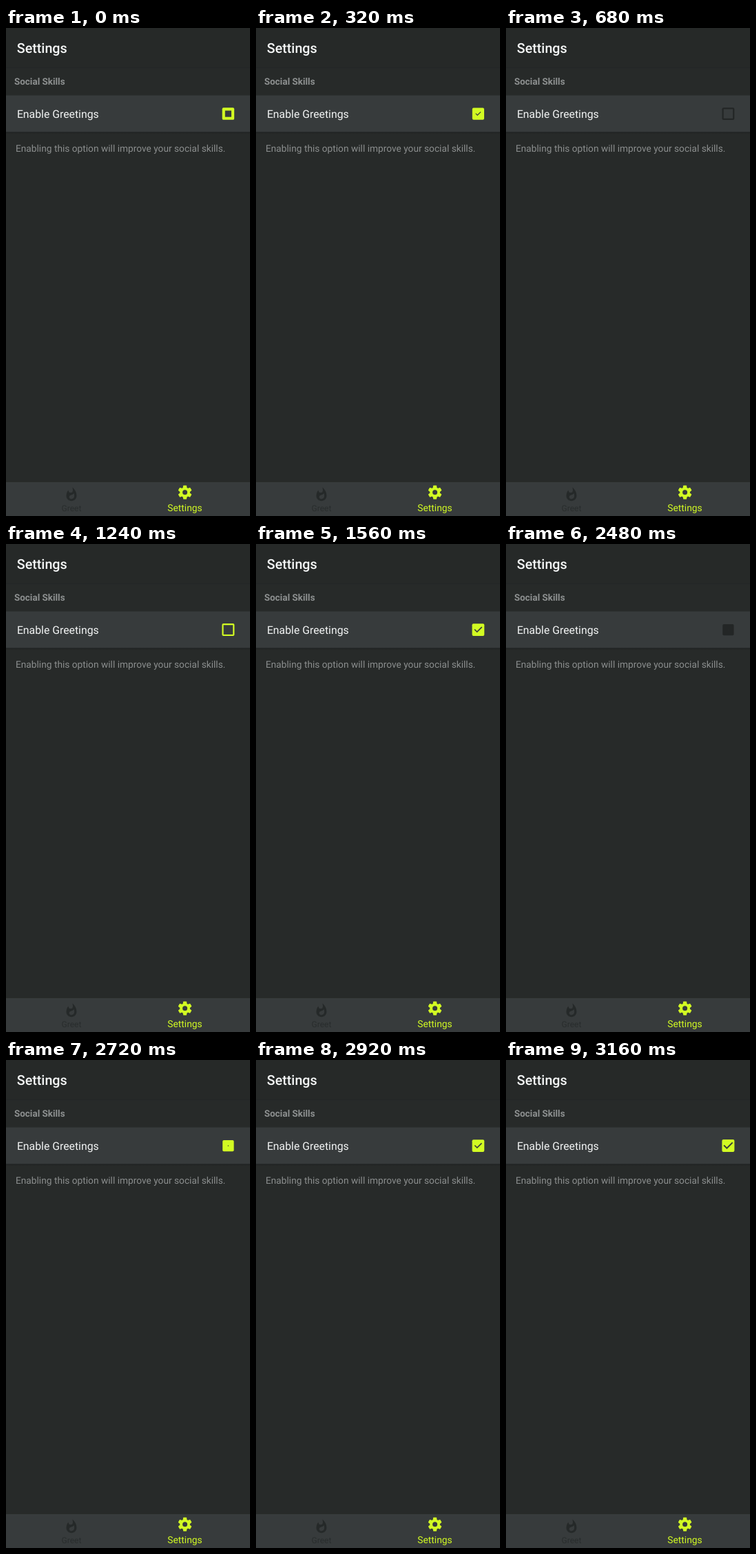
These frames come from a looping animation (354 by 706 pixels, 4.4 s). An HTML page:

```html
<!DOCTYPE html>
<html lang="en">
<head>
<meta charset="utf-8">
<title>Settings</title>
<style>
  html, body { margin: 0; width: 100%; height: 100%; overflow: hidden; background: #272a29; }
  svg { display: block; width: 100vw; height: 100vh; font-family: Roboto, sans-serif; text-rendering: geometricPrecision; }
</style>
</head>
<body>
<svg viewBox="0 0 354 706">
  <defs>
    <linearGradient id="shade" x1="0" y1="0" x2="0" y2="1">
      <stop offset="0" stop-color="#1f2222"/>
      <stop offset="1" stop-color="#272a29"/>
    </linearGradient>
  </defs>
  <rect width="354" height="706" fill="#272a29"/>
  <rect width="354" height="57" fill="#262928"/>
  <rect y="57" width="354" height="1" fill="#232626"/>
  <rect y="97.5" width="354" height="53" fill="#373b3c"/>
  <rect y="150.5" width="354" height="3" fill="url(#shade)"/>
  <rect y="657" width="354" height="49" fill="#373b3c"/>

  <text x="15.8" y="35.8" font-size="19.7" font-weight="500" fill="#f6f8f8">Settings</text>
  <text x="12" y="82" font-size="13.45" font-weight="700" fill="#8d9090">Social Skills</text>
  <text x="15.9" y="130.2" font-size="15.8" fill="#f2f4f4">Enable Greetings</text>
  <text x="14" y="179" font-size="13.73" fill="#8b8e8e">Enabling this option will improve your social skills.</text>

  <g id="check">
    <rect id="box" x="-9" y="-9" width="18" height="18" rx="2"/>
    <rect id="hole" fill="#373b3c"/>
    <path id="tick" fill="#373b3c" d="M-2 5L-7 0-5.59-1.41-2 2.17 5.59-5.42 7-4z"/>
  </g>

  <path transform="translate(83.8 663.8) scale(.93)" fill="#252929" fill-rule="evenodd"
    d="M13.5.67s.74 2.65.74 4.8c0 2.06-1.35 3.73-3.41 3.73-2.07 0-3.63-1.67-3.63-3.73l.03-.36C5.21 7.51 4 10.62 4 14c0 4.42 3.58 8 8 8s8-3.58 8-8C20 8.61 17.41 3.8 13.5.67zM11.71 19c-1.78 0-3.22-1.4-3.22-3.14 0-1.62 1.05-2.76 2.81-3.12 1.77-.36 3.6-1.21 4.62-2.58.39 1.29.59 2.65.59 4.04 0 2.65-2.15 4.8-4.8 4.8z"/>
  <text x="95" y="698.8" font-size="12" text-anchor="middle" fill="#292d2d">Greet</text>

  <g id="gear" transform="translate(259.6 671.8)" fill="#d2fb23">
    <circle r="7.4"/>
    <circle id="hub" r="3.5" fill="#373b3c"/>
  </g>
  <text x="259.5" y="699.3" font-size="13.8" text-anchor="middle" fill="#d2fb23">Settings</text>
</svg>
<script>
const LOOP = 4400, FILL = 166, DRAW = 334;
const ON = '#d2fb23', OFF = '#232626';
const $ = id => document.getElementById(id);
const check = $('check'), box = $('box'), hole = $('hole'), tick = $('tick');

for (let i = 0; i < 6; i++) {
  const tooth = document.createElementNS('http://www.w3.org/2000/svg', 'path');
  tooth.setAttribute('d', 'M-3-6.4L-2.4-9.5Q-2.3-10-1.8-10H1.8Q2.3-10 2.4-9.5L3-6.4z');
  tooth.setAttribute('transform', `rotate(${i * 60})`);
  $('gear').insertBefore(tooth, $('hub'));
}

// Taps: start time, new state, and how far the transition has already run
const taps = [
  { at: 120, on: true, skip: 46 },
  { at: 340, on: false, skip: 0 },
  { at: 1240, on: true, skip: 0 },
  { at: 2360, on: false, skip: 0 },
  { at: 2617, on: true, skip: 0 }
];

const part = (t, from, len) => Math.min(1, Math.max(0, (t - from) / len));
const easeOut = p => 1 - (1 - p) ** 3;

// Standard curve: cubic-bezier(.4, 0, .2, 1)
function standard(x) {
  let lo = 0, hi = 1;
  for (let i = 0; i < 20; i++) {
    const m = (lo + hi) / 2;
    const bx = 1.2 * m * (1 - m) ** 2 + 0.6 * m * m * (1 - m) + m ** 3;
    if (bx < x) lo = m; else hi = m;
  }
  return 3 * lo * lo * (1 - lo) + lo ** 3;
}

function draw(t) {
  const tap = taps.filter(p => p.at <= t).pop() || taps[0];
  const run = Math.max(0, t - tap.at) + tap.skip;
  const shrink = standard(part(run, 0, FILL)), grow = easeOut(part(run, FILL, DRAW));
  let size, scale;
  if (tap.on) {
    size = 13.6 * (1 - shrink);
    scale = run > FILL ? 0.1 + 0.9 * grow : 0;
  } else {
    size = 13.6 * standard(part(run, FILL, FILL));
    scale = run < FILL ? 1 - 0.9 * shrink : 0;
  }
  const zoom = 1 - 0.1 * (shrink - grow);
  check.setAttribute('transform', `translate(322.4 124.1) scale(${zoom})`);
  box.setAttribute('fill', tap.on ? ON : OFF);
  hole.setAttribute('x', -size / 2);
  hole.setAttribute('y', -size / 2);
  hole.setAttribute('width', size);
  hole.setAttribute('height', size);
  tick.setAttribute('transform', `scale(${scale})`);
}

const begin = performance.now();
function loop() {
  draw((performance.now() - begin) % LOOP);
  requestAnimationFrame(loop);
}
draw(0);
requestAnimationFrame(loop);
</script>
</body>
</html>
```
